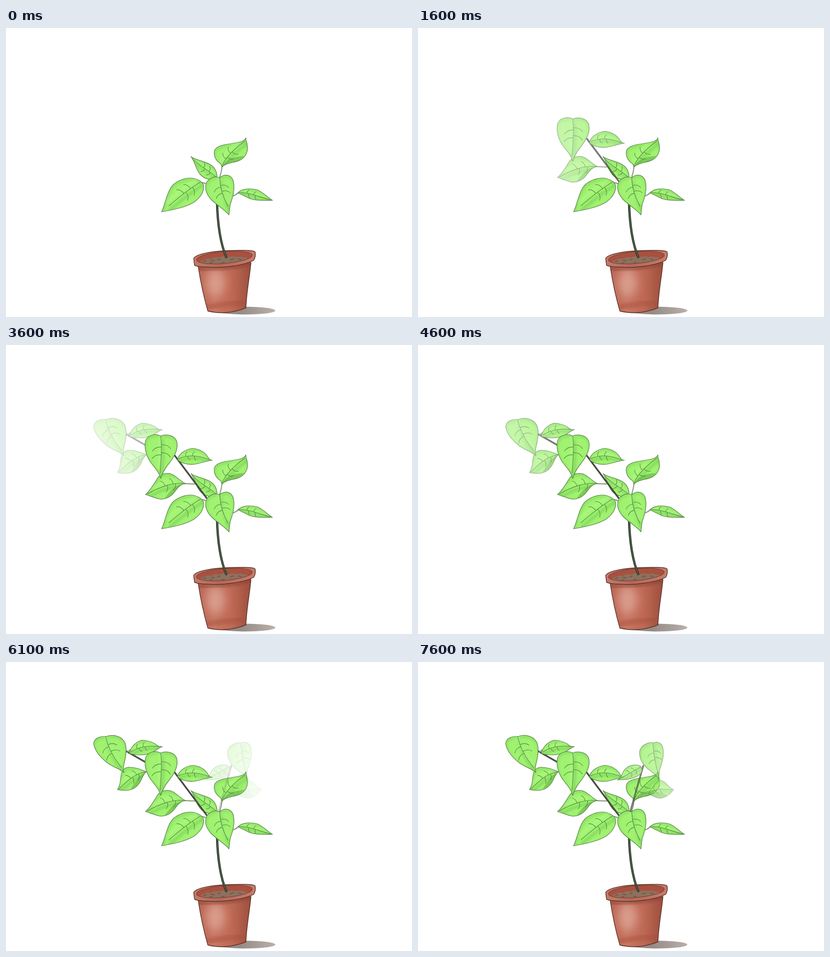
Animation, 885 px wide and 632 px high, one loop 8000 ms. Source, as an HTML page:

```html
<!DOCTYPE html>
<html lang="en">
<head>
<meta charset="utf-8">
<title>Growing plant</title>
<style>
  html, body { margin: 0; width: 100%; height: 100%; overflow: hidden; background: #fff; }
  svg { display: block; }
  path { fill: none; stroke-linecap: round; stroke-linejoin: round; }
  .blade { fill: #a0f270; }
  .fold { fill: #5fae42; opacity: .55; }
  .edge { stroke: #557f45; stroke-width: 1.2; }
  .rib { stroke: #508440; stroke-width: 1.1; }
  .vein { stroke: #4d873b; stroke-width: 1.1; }
  .dark { stroke: #6fc850; stroke-width: 7; opacity: .5; }
  .light { stroke: #b4fb8b; stroke-width: 7; opacity: .5; }
  .stalk { stroke: #66805a; stroke-width: 2.4; }
  .stalkCore { stroke: #bcd6ae; stroke-width: .9; }
  .twig { stroke: #33352f; stroke-width: 3.6; }
  .twigCore { stroke: #73766a; stroke-width: 1; }
  .pot { stroke: #532c22; stroke-width: 1.4; }
</style>
</head>
<body>
<svg width="885" height="632" viewBox="0 0 885 632">
  <defs>
    <filter id="soft" x="-30%" y="-30%" width="160%" height="160%"><feGaussianBlur stdDeviation="2.5"/></filter>
    <filter id="haze" x="-60%" y="-60%" width="220%" height="220%"><feGaussianBlur stdDeviation="10"/></filter>
    <linearGradient id="clay">
      <stop stop-color="#b96553"/><stop offset=".3" stop-color="#c87663"/>
      <stop offset=".65" stop-color="#bd6854"/><stop offset="1" stop-color="#9d4e3e"/>
    </linearGradient>
    <linearGradient id="rim">
      <stop stop-color="#c47a69"/><stop offset=".4" stop-color="#b86656"/><stop offset="1" stop-color="#c67c6b"/>
    </linearGradient>
    <linearGradient id="ground">
      <stop offset=".4" stop-color="#958a84"/><stop offset="1" stop-color="#b9b0ab"/>
    </linearGradient>
    <clipPath id="potClip"><path d="M419 520L440 619Q480 629 523 612L534 511Z"/></clipPath>
    <clipPath id="mouthClip"><ellipse cx="476" cy="502" rx="61" ry="13" transform="rotate(-5 476 502)"/></clipPath>
  </defs>
  <ellipse cx="522" cy="618" rx="65" ry="8.5" fill="url(#ground)"/>
  <g id="pot">
    <path d="M419 520C424 555 433 595 440 619Q480 629 523 612C524 580 531 545 534 511Z" style="fill:url(#clay)"/>
    <g clip-path="url(#potClip)">
      <ellipse cx="457" cy="558" rx="21" ry="30" fill="#e5b5a7" opacity=".6" filter="url(#haze)"/>
      <path d="M419 527Q485 530 534 515" stroke="#7c3c2e" stroke-width="6" opacity=".5" filter="url(#soft)"/>
      <path d="M436 611Q480 602 526 600" stroke="#a64f3d" stroke-width="12" opacity=".4" filter="url(#soft)"/>
    </g>
    <path class="pot" d="M419 522C424 555 433 595 440 619Q480 629 523 612C524 580 531 545 534 513"/>
    <path class="pot" style="fill:url(#rim)" d="M409 504C414 494 450 488 480 487C510 486 541 485 543 490Q545 500 540 508C520 519 470 526 440 523Q420 523 411 519Z"/>
    <g clip-path="url(#mouthClip)">
      <rect x="410" y="480" width="130" height="40" fill="#a9503f"/>
      <path d="M422 515Q424 508 432 507Q438 502 447 505Q454 499 464 502Q474 497 484 501Q494 498 503 501Q511 498 518 502Q525 501 529 506L533 522H414Z" style="fill:#8d705e"/>
      <path d="M430 511l6-2M447 508l7 1M462 507l5-2M489 507l7-2M507 505l6 2M444 514l6-1M470 513l6 0" stroke="#684f41" stroke-width="1.5"/>
    </g>
    <ellipse cx="476" cy="502" rx="61" ry="13" transform="rotate(-5 476 502)" fill="none" stroke="#6b3a2e"/>
  </g>
  <path d="M460 380C461 420 465 465 480 501" stroke="#29332a" stroke-width="5"/>
  <path d="M460.3 383C461.3 420 465.3 465 480 501" stroke="#586e51" stroke-width="1.8"/>
  <g id="plant"></g>
</svg>
<script>
const defs = document.querySelector('defs');
const plant = document.getElementById('plant');
let leafCount = 0;

const stroke = (cls, d, extra = '') => `<path class="${cls}" d="${d}" ${extra}/>`;
const stalk = d => stroke('stalk', d) + stroke('stalkCore', d);
const twig = d => stroke('twig', d) + stroke('twigCore', d);

// Side veins leave the midrib at a right angle and bend towards the tip.
function veins(rib, size) {
  const curve = document.createElementNS('http://www.w3.org/2000/svg', 'path');
  curve.setAttribute('d', rib);
  const length = curve.getTotalLength();
  let d = '';
  for (const part of [.27, .48]) {
    for (const side of [-1, 1]) {
      const start = length * (part + side * .03);
      const p = curve.getPointAtLength(start);
      const q = curve.getPointAtLength(start + 1);
      const tx = q.x - p.x, ty = q.y - p.y;
      const at = (along, across) =>
        `${p.x + size * (tx * along - ty * across * side)} ${p.y + size * (ty * along + tx * across * side)}`;
      d += `M${p.x} ${p.y}Q${at(-.05, .75)} ${at(.5, 1.1)}`;
    }
  }
  return d;
}

function leaf(outline, rib, size, fold = '') {
  const id = 'leaf' + leafCount++;
  defs.insertAdjacentHTML('beforeend', `<clipPath id="${id}"><path d="${outline}"/></clipPath>`);
  return stroke('blade', outline) +
    `<g clip-path="url(#${id})"><g filter="url(#soft)">` +
    stroke('dark', outline, 'transform="translate(1 3)" style="stroke-width:4"') +
    stroke('dark', rib, `transform="translate(3 ${size * .55})"`) +
    stroke('light', rib, `transform="translate(-3 ${-size * .6})"`) +
    '</g>' + stroke('fold', fold) + '</g>' +
    stroke('edge', outline) + stroke('rib', rib) + stroke('vein', veins(rib, size));
}

// A branch fades in from its base (x1, y1) towards its far side (x2, y2).
function branch(id, [x1, y1, x2, y2], parts) {
  defs.insertAdjacentHTML('beforeend',
    `<linearGradient id="${id}Fade" gradientUnits="userSpaceOnUse" x1="${x1}" y1="${y1}" x2="${x2}" y2="${y2}">
       <stop stop-color="#fff"/><stop offset="1" stop-color="#fff"/></linearGradient>
     <mask id="${id}Mask" maskUnits="userSpaceOnUse" x="0" y="0" width="885" height="632">
       <rect width="885" height="632" fill="url(#${id}Fade)"/></mask>`);
  return `<g id="${id}" mask="url(#${id}Mask)">${parts.join('')}</g>`;
}

const base = [
  stalk('M471 302Q470 314 466 326'),
  leaf('M523 240C519 250 505 250 490 253C472 255 456 259 454 270C453 283 460 292 468 297L471 304C480 294 500 295 512 288C524 281 528 268 526 258C526 250 522 247 523 240Z',
    'M471 302C478 283 498 264 521 247', 12,
    'M471 304C478 288 494 281 520 280C512 292 485 294 471 304Z'),
  leaf('M403 281C412 289 432 290 446 299C455 305 460 314 460 326C452 333 436 333 425 322C414 312 413 294 403 281Z',
    'M458 326C441 310 420 302 406 285', 9),
  stalk('M417 337Q427 337 437 341'),
  leaf('M339 402C347 388 350 357 365 342C380 330 398 326 410 329C420 332 431 337 431 347C431 360 422 372 410 381C390 393 362 398 339 402Z',
    'M424 337C405 348 377 370 355 389', 15),
  stalk('M496 367Q501 365 507 360'),
  leaf('M506 360C515 351 533 350 548 354C562 360 570 371 581 377C560 377 540 378 527 371C518 366 511 364 506 360Z',
    'M508 360C530 359 555 371 577 376', 7)
].join('');

const front = leaf(
  'M466 328C475 318 490 320 495 333C500 350 494 372 489 385C487 395 487 402 486 409C478 398 460 388 447 375C435 362 432 348 438 336C446 326 458 323 466 328Z',
  'M466 329C467 350 474 372 484 390', 15);

const middle = branch('middle', [440, 280, 304, 310], [
  twig('M368 242L439 337'),
  stalk('M388 303L411 304'),
  leaf('M304 327C315 318 323 303 331 290C340 280 355 278 366 285C376 292 384 300 391 303C378 305 374 313 367 322C359 333 347 338 335 337C323 334 314 330 304 327Z',
    'M390 303C365 300 335 310 308 326', 12,
    'M391 303C370 305 358 318 345 337C368 338 372 312 391 303Z'),
  leaf('M374 251C376 238 392 227 408 226C424 228 434 235 440 245C443 250 446 252 450 252C436 254 426 258 410 261C394 262 380 258 374 251Z',
    'M376 249C395 240 415 240 444 251', 8),
  leaf('M337 199C346 195 366 195 372 210C377 228 366 246 353 262C345 272 341 281 337 292C335 280 327 272 317 259C305 243 301 225 304 210C308 196 327 193 337 199Z',
    'M337 199C341 218 338 250 336 280', 18)
]);

const left = branch('left', [320, 195, 205, 245], [
  twig('M262 195L304 219'),
  stalk('M265 197L271 192'),
  leaf('M243 279C250 268 249 258 251 246C253 236 258 231 268 230C284 230 296 236 306 240C298 246 297 256 290 266C282 277 270 281 260 281C253 280 248 281 243 279Z',
    'M305 240C280 244 262 262 246 278', 11,
    'M306 240C290 247 281 263 270 281C292 277 292 250 306 240Z'),
  leaf('M269 200C271 188 280 176 296 171C310 171 325 177 330 183C333 185 337 185 341 185C332 188 327 194 318 198C302 205 284 204 269 200Z',
    'M272 197C290 185 310 182 335 185', 8),
  leaf('M218 163C230 158 251 160 259 176C265 190 261 208 258 220C255 230 255 236 257 242C250 234 235 231 220 220C205 208 193 194 191 178C193 164 210 162 218 163Z',
    'M217 163C222 185 235 210 252 231', 16)
]);

const right = branch('right', [445, 235, 550, 275], [
  twig('M491 227L463 326'),
  stalk('M478 281Q490 288 504 287'),
  leaf('M526 258C540 260 545 275 557 279C550 288 540 297 528 298C518 297 510 293 503 287C510 275 518 265 526 258Z',
    'M504 287C520 276 535 277 553 280', 8,
    'M503 287C520 284 532 285 545 292C530 302 515 297 503 287Z'),
  leaf('M434 258C445 255 443 240 454 232C463 224 477 224 484 227C489 232 490 240 483 246C472 256 450 258 434 258Z',
    'M486 229C472 238 455 246 438 257', 8),
  leaf('M513 177C522 173 532 177 534 189C537 207 531 222 527 235C525 242 526 249 525 257C520 246 508 240 498 231C486 219 481 205 484 192C490 179 505 175 513 177Z',
    'M512 178C514 200 518 230 525 247', 13)
]);

plant.innerHTML = base + left + middle + front + right;

const LOOP = 8000, STEP = 500, STEPS = 6;
const branches = ['middle', 'left', 'right'].map((id, i) => ({
  start: 100 + i * STEP * STEPS,
  group: document.getElementById(id),
  stops: document.querySelectorAll(`#${id}Fade stop`)
}));

function draw() {
  const time = performance.now() % LOOP;
  for (const { start, group, stops } of branches) {
    const step = Math.floor((time - start) / STEP) + 1;
    const shown = Math.max(0, Math.min(STEPS, step)) / STEPS;
    const spread = shown * (1 - shown);
    group.style.display = shown ? '' : 'none';
    stops[0].setAttribute('stop-opacity', shown + .8 * spread);
    stops[1].setAttribute('stop-opacity', shown - .5 * spread);
  }
  requestAnimationFrame(draw);
}
draw();
</script>
</body>
</html>
```
